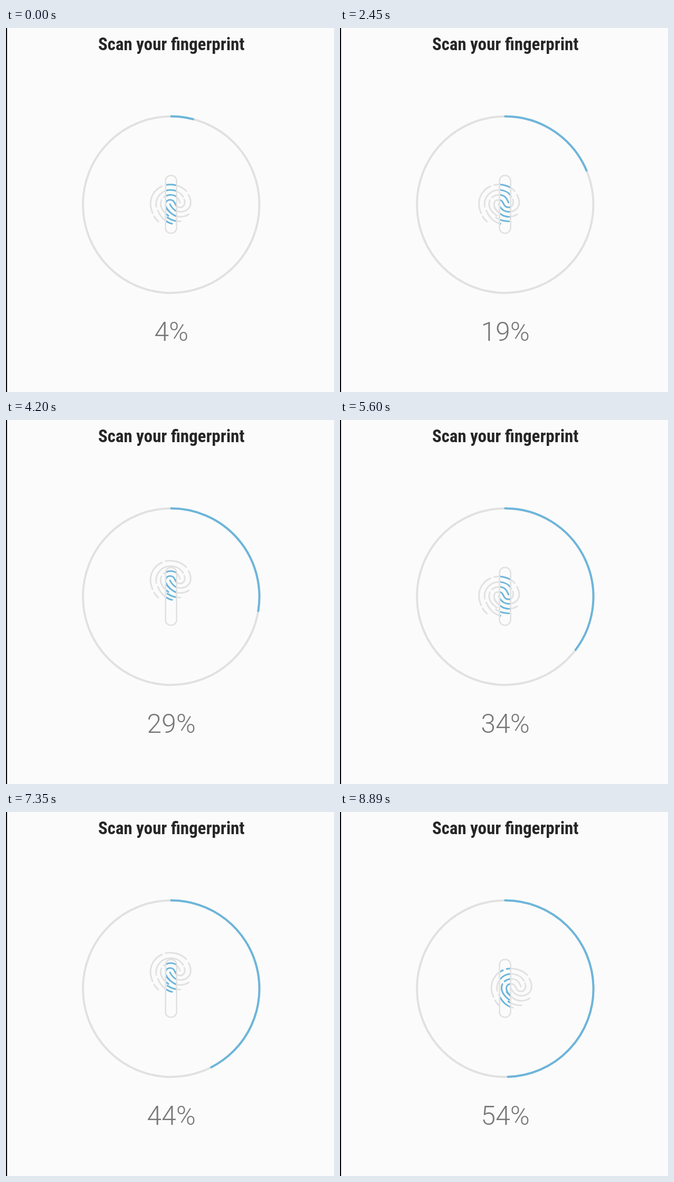
Recreate the animation shown at these times as an HTML page. Size 622 by 690 pixels, loop 8960 ms.

```html
<!DOCTYPE html>
<html lang="en">
<head>
<meta charset="utf-8">
<title>Fingerprint setup</title>
<style>
  html, body { margin: 0; width: 100%; height: 100%; overflow: hidden; background: #fbfbfb; }
  svg { display: block; width: 622px; height: 690px; }
  text { text-anchor: middle; }
  .title { font: 700 33px "Roboto Condensed", Roboto, sans-serif; font-stretch: 75%; fill: #262626; }
  .percent { font: 300 50px Roboto, sans-serif; fill: #777; }
  .line { fill: none; stroke: #e1e1e1; stroke-linecap: round; stroke-linejoin: round; }
  .blue { stroke: #6cb5da; }
</style>
</head>
<body>
<svg viewBox="0 0 622 690">
  <defs>
    <clipPath id="slot"><rect x="304" y="281" width="18.5" height="106" rx="8"/></clipPath>
    <g id="print">
      <path d="M-16-34C-30-28-38-15-38-1C-38 6-36 12-34 17M-31 23Q-28 29-23 33"/>
      <path d="M-9-36.5C5-39 20-35 30-25"/>
      <path d="M34-18C40-8 40 4 32 10C24 16 15 15 9 12Q2 7-1 0"/>
      <path d="M3 37C-7 35-18 27-24 12M-27 5C-30-12-17-27 0-27C10-27 19-22 24-14M26-9C29-1 25 6 18 6C12 6 10 2 8-2C5-11-8-10-9.5-1C-10 5-7 9-2 14"/>
      <path d="M-13-13C-4-20 9-19 14-11Q17-6 18-3"/>
      <path d="M-17-8C-21 1-17 10-10 17Q-7 20-4 22"/>
      <path d="M-9 7C-4 13 2 19 9 22Q22 27 35 19"/>
      <path d="M-6 25Q5 33 19 32.5"/>
    </g>
  </defs>
  <rect width="622" height="690" fill="#fbfbfb"/>
  <rect width="2" height="690" fill="#000"/>
  <text class="title" x="313.5" y="42">Scan your fingerprint</text>
  <circle class="line" cx="313.2" cy="334.9" r="167.3" stroke-width="4"/>
  <path id="arc" class="line blue" stroke-width="4"/>
  <use id="base" href="#print" class="line" stroke-width="3"/>
  <rect class="line" x="302.5" y="279.5" width="21" height="109.5" rx="10" stroke-width="2.6" style="fill:#fbfbfb"/>
  <g clip-path="url(#slot)"><use id="scan" href="#print" class="line blue" stroke-width="3"/></g>
  <text id="label" class="percent" x="313.5" y="592.5"></text>
</svg>
<script>
  const LOOP = 8960, STEP = 70, GROW = 500;
  const CX = 313.2, CY = 334.9, R = 167.3;
  const byId = id => document.getElementById(id);
  const poses = { C: [0, 0], U: [0, -30], D: [0, 30], L: [-10.5, 0], R: [13, 0] };

  // touch: pose time, pose, arc start, arc target, label time
  const touches = [
    [0, 'C', -GROW, 4, 0],
    [350, 'U', 350, 9, 350],
    [1190, 'D', 1174, 14, 1190],
    [2030, 'L', 2030, 19, 2030],
    [2940, 'R', 2995, 24, 2940],
    [3850, 'U', 3878, 29, 3850],
    [4690, 'D', 4690, 34, 4690],
    [5460, 'L', 5430, 39, 5670],
    [6370, 'R', 6370, 39, 6370],
    [7000, 'U', 7035, 44, 7000],
    [7840, 'L', 7840, 49, 7840],
    [8820, 'R', 8788, 54, 8820]
  ];

  const ease = u => 0.5 - 0.5 * Math.cos(Math.PI * Math.min(1, Math.max(0, u)));

  function arcPath(value) {
    const a = value / 100 * 2 * Math.PI;
    const x = CX + R * Math.sin(a), y = CY - R * Math.cos(a);
    return `M${CX} ${CY - R}A${R} ${R} 0 ${value > 50 ? 1 : 0} 1 ${x.toFixed(2)} ${y.toFixed(2)}`;
  }

  function draw(t) {
    let value = 0, last = 0, shown = 4, pose = 'C';
    for (const [at, key, start, target, labelAt] of touches) {
      value += (target - last) * ease((t - start) / GROW);
      last = target;
      if (t >= at) pose = key;
      if (t >= labelAt) shown = target;
    }
    const [dx, dy] = poses[pose];
    const place = `translate(${312 + dx} ${334 + dy})`;
    byId('base').setAttribute('transform', place);
    byId('scan').setAttribute('transform', place);
    byId('arc').setAttribute('d', arcPath(value));
    byId('label').textContent = shown + '%';
  }

  function tick() {
    const t = performance.now() % LOOP;
    draw(Math.floor(t / STEP) * STEP);
    requestAnimationFrame(tick);
  }
  tick();
</script>
</body>
</html>
```
